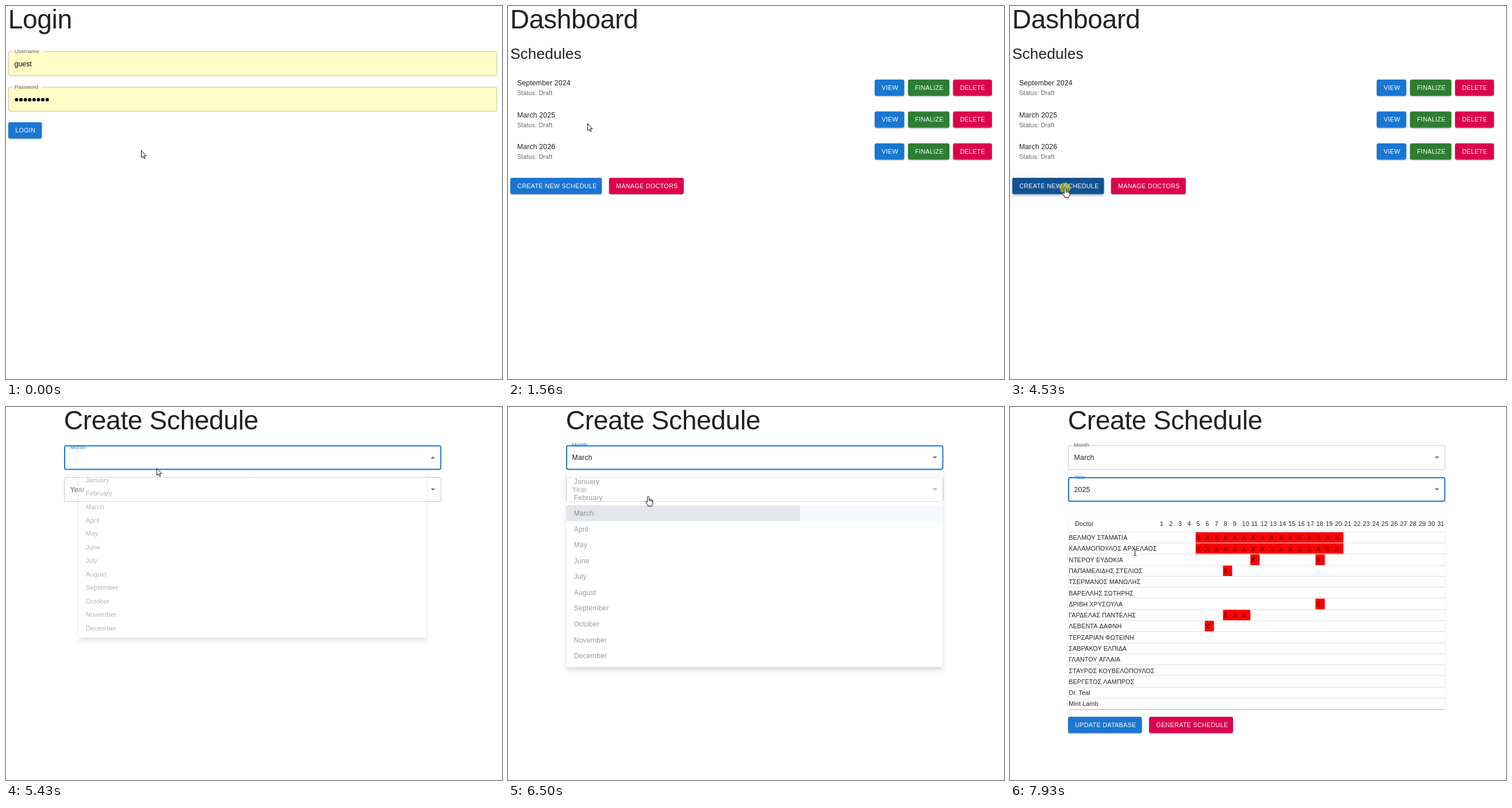
Recreate the animation shown at these times as an HTML page with a canvas. Size 863 px wide and 649 px high, loop 7990 ms.

```html
<!DOCTYPE html>
<html lang="en">
<head>
<meta charset="utf-8">
<title>Schedule planner</title>
<style>
html, body { margin: 0; width: 100%; height: 100%; overflow: hidden; background: #fff; }
canvas { display: block; }
</style>
</head>
<body>
<canvas id="stage" width="863" height="649"></canvas>
<script>
const ctx = document.getElementById('stage').getContext('2d');
const LOOP = 7990;
const BLUE = '#1976d2', DARK_BLUE = '#115293', RED = '#dc004e', GREEN = '#2e7d32';
const INK = 'rgba(0,0,0,.87)', SOFT = 'rgba(0,0,0,.6)', LINE = 'rgba(0,0,0,.23)';
const SMALL = 9.24, BODY2 = 10.78, BODY = 12.32, H4 = 26.2, H2 = 46.2;
const MONTHS = ['January', 'February', 'March', 'April', 'May', 'June', 'July', 'August',
  'September', 'October', 'November', 'December'];
const YEARS = ['2025', '2026'];
const DOCTORS = ['ΒΕΛΜΟΥ ΣΤΑΜΑΤΙΑ', 'ΚΑΛΑΜΟΠΟΥΛΟΣ ΑΡΧΕΛΑΟΣ', 'ΝΤΕΡΟΥ ΕΥΔΟΚΙΑ', 'ΠΑΠΑΜΕΛΙΔΗΣ ΣΤΕΛΙΟΣ',
  'ΤΣΕΡΜΑΝΟΣ ΜΑΝΩΛΗΣ', 'ΒΑΡΕΛΛΗΣ ΣΩΤΗΡΗΣ', 'ΔΡΙΒΗ ΧΡΥΣΟΥΛΑ', 'ΓΑΡΔΕΛΑΣ ΠΑΝΤΕΛΗΣ', 'ΛΕΒΕΝΤΑ ΔΑΦΝΗ',
  'ΤΕΡΖΑΡΙΑΝ ΦΩΤΕΙΝΗ', 'ΣΑΒΡΑΚΟΥ ΕΛΠΙΔΑ', 'ΓΛΑΝΤΟΥ ΑΓΛΑΙΑ', 'ΣΤΑΥΡΟΣ ΚΟΥΒΕΛΟΠΟΥΛΟΣ',
  'ΒΕΡΓΕΤΟΣ ΛΑΜΠΡΟΣ', 'Dr. Teal', 'Mint Lamb'];
// [row, first day, last day]
const BUSY = [[0, 5, 20], [1, 5, 20], [2, 11, 11], [2, 18, 18], [3, 8, 8], [6, 18, 18], [7, 8, 10], [8, 6, 6]];

const T = { dashboard: 1270, create: 4680, monthOpen: 5330, monthPick: 6372,
  yearOpen: 7120, yearPick: 7650, table: 7740 };
const CLICKS = [[1030, 1110], [4530, 4640], [5300, 5400], [6290, 6380], [7110, 7200], [7590, 7660]];
// [time, x, y]
const PATH = [[60, 235, 251], [300, 190, 172], [480, 120, 178], [690, 40, 214], [1030, 40, 214],
  [1180, 85, 223], [1500, 138, 208], [1800, 138, 188], [2250, 112, 285], [2530, 96, 316],
  [4600, 96, 316], [5290, 262, 105], [5430, 262, 106], [5740, 243, 184], [6330, 243, 184],
  [6500, 244, 155], [7060, 240, 147], [7130, 240, 147], [7390, 240, 186], [7640, 240, 186],
  [7930, 217.5, 253]];
const KINDS = [[0, 'arrow'], [270, 'beam'], [520, 'arrow'], [630, 'hand'], [1090, 'arrow'], [2400, 'hand'],
  [4700, 'arrow'], [5200, 'hand'], [5330, 'arrow'], [5560, 'hand'], [7130, 'arrow'], [7290, 'hand'],
  [7720, 'arrow'], [7880, 'beam']];
const CURSORS = {
  arrow: new Path2D('M.5.5V13L3.2 10.3 5.2 14.6 7.1 13.8 5.1 9.5H9Z'),
  hand: new Path2D('M-1.5 1.5Q0-1 1.5 1.5V6Q3 5 4 6.5 5.5 5.5 6.3 7 8 6.5 8 8.5V12Q8 14 6.5 15.5V17.5H-.5V16L-4.5 10.5Q-5 8.5-3 9L-1.5 10.5ZM1.5 6V9M4 6.5V9.5M6.3 7V10'),
  beam: new Path2D('M-2.5-5.5H-.8L0-5 .8-5.5H2.5M0-5V5M-2.5 5.5H-.8L0 5 .8 5.5H2.5')
};
// elevation: [dy, blur, spread, alpha]
const SHADOWS = {
  1: [[1.5, .8, -.8, .2], [.8, .8, 0, .14], [.8, 2.3, 0, .12]],
  2: [[2.3, .8, -1.5, .2], [1.5, 1.5, 0, .14], [.8, 3.9, 0, .12]],
  4: [[1.5, 3, -.8, .2], [3, 3.9, 0, .14], [.8, 7.7, 0, .12]],
  8: [[3.9, 3.9, -2.3, .2], [6.2, 7.7, .8, .14], [2.3, 10.8, 1.5, .12]]
};

const clamp = v => Math.max(0, Math.min(1, v));
const lerp = (a, b, p) => a + (b - a) * p;

// cubic-bezier(x1, 0, x2, 1)
function bezier(x1, x2, x) {
  let lo = 0, hi = 1, u = .5;
  for (let i = 0; i < 20; i++) {
    u = (lo + hi) / 2;
    if (3 * x1 * u * (1 - u) ** 2 + 3 * x2 * u * u * (1 - u) + u ** 3 < x) lo = u; else hi = u;
  }
  return u * u * (3 - 2 * u);
}
const inOut = x => bezier(.4, .2, clamp(x));
const easeOut = x => bezier(0, .2, clamp(x));

function text(str, x, y, size = BODY2, color = INK, spacing = .0094, align = 'left') {
  ctx.font = `${size}px "Liberation Sans", Arial, sans-serif`;
  ctx.letterSpacing = size * spacing + 'px';
  ctx.textAlign = align;
  ctx.fillStyle = color;
  ctx.fillText(str, x, y);
}

function box(x, y, w, h, r) {
  ctx.beginPath();
  ctx.roundRect(x, y, w, h, r);
}

function fillRect(x, y, w, h, color) {
  ctx.fillStyle = color;
  ctx.fillRect(x, y, w, h);
}

function paper(x, y, w, h, color, elevation) {
  ctx.save();
  box(x, y, w, h, 3);
  ctx.rect(-999, -999, 3000, 3000);
  ctx.clip('evenodd');
  const m = ctx.getTransform();
  ctx.setTransform(m.a, 0, 0, m.d, m.e - 2000, m.f);
  ctx.fillStyle = '#000';
  for (const [dy, blur, spread, alpha] of SHADOWS[elevation]) {
    ctx.shadowColor = `rgba(0,0,0,${alpha})`;
    ctx.shadowBlur = blur;
    ctx.shadowOffsetX = 2000;
    ctx.shadowOffsetY = dy;
    box(x - spread, y - spread, w + 2 * spread, h + 2 * spread, 3);
    ctx.fill();
  }
  ctx.restore();
  ctx.fillStyle = color;
  box(x, y, w, h, 3);
  ctx.fill();
}

function button(label, x, y, w, color, hover = 0) {
  paper(x, y, w, 28.2, color, hover > .5 ? 4 : 2);
  if (hover) {
    ctx.save();
    ctx.globalAlpha = hover;
    ctx.fillStyle = DARK_BLUE;
    ctx.fill();
    ctx.restore();
  }
  text(label, x + 12.2, y + 17.8, BODY2, '#fff', .0286);
}

function outline(x, y, w, h, color, width = 1) {
  box(x, y, w, h, 3);
  ctx.lineWidth = width;
  ctx.strokeStyle = color;
  ctx.stroke();
}

function filledInput(label, y, notchEnd, hover) {
  box(4, y, 850.5, 43, 3);
  ctx.fillStyle = '#fffcc8';
  ctx.fill();
  outline(4.5, y + .5, 849.5, 42, hover ? INK : LINE);
  fillRect(11, y - 1, notchEnd - 11, 2, '#fff');
  text(label, 14.8, y + 3, SMALL, SOFT);
}

function loginPage(t) {
  text('Login', 3.7, 39, H2, INK, -.0083);
  filledInput('Username', 78.8, 65);
  text('guest', 14.6, 105, BODY, '#000', 0);
  filledInput('Password', 140.5, 62, t > 270 && t < 520);
  ctx.fillStyle = '#000';
  for (let i = 0; i < 8; i++) {
    ctx.beginPath();
    ctx.arc(18.4 + 7.6 * i, 163, 3, 0, 7);
    ctx.fill();
  }
  button('LOGIN', 4, 202.2, 58.3, BLUE, inOut((t - 620) / 190) * (1 - inOut((t - 1170) / 250)));
}

function dashboardPage(t) {
  text('Dashboard', 3.7, 39, H2, INK, -.0083);
  text('Schedules', 3.9, 91.5, H4, INK, .0073);
  ['September 2024', 'March 2025', 'March 2026'].forEach((name, i) => {
    const y = 128 + 55.5 * i;
    text(name, 16, y + 10, BODY);
    text('Status: Draft', 16, y + 27, BODY2, SOFT, .0107);
    button('VIEW', 638, y, 51.5, BLUE);
    button('FINALIZE', 696, y, 72, GREEN);
    button('DELETE', 774.3, y, 67.7, RED);
  });
  button('CREATE NEW SCHEDULE', 4, 299, 159.3, BLUE, inOut((t - 2360) / 180));
  button('MANAGE DOCTORS', 175.8, 299, 130, RED);
}

function select(t, label, value, y, focusStart, focusEnd, open, hover) {
  const p = easeOut((t - focusStart) / 200);
  const focused = t >= focusStart && t < focusEnd;
  text(label, 111.6, lerp(y + 25.7, y + 2.5, p), lerp(BODY, SMALL, p), focused ? BLUE : SOFT);
  if (focused) outline(102, y + 1, 654.5, 41, BLUE, 2);
  else outline(101.5, y + .5, 655.5, 42, hover ? INK : LINE);
  text(value, 111.6, y + 25.7, BODY);
  const dir = open ? -1 : 1, mid = y + 21.3;
  ctx.beginPath();
  ctx.moveTo(738.9, mid - 1.9 * dir);
  ctx.lineTo(746.7, mid - 1.9 * dir);
  ctx.lineTo(742.8, mid + 1.9 * dir);
  ctx.fillStyle = 'rgba(0,0,0,.54)';
  ctx.fill();
}

function menu(t, items, top, start, pick, duration, picked) {
  if (t < start || t > pick + duration) return;
  const closing = t >= pick;
  const grow = closing ? 1 - inOut((t - pick - duration / 3) / (duration * .667))
    : inOut((t - start) / (duration * .667));
  const scale = .75 + .25 * grow, row = 27.65;
  ctx.save();
  ctx.globalAlpha = closing ? 1 - inOut((t - pick) / duration) : inOut((t - start) / duration);
  ctx.translate(429, top);
  ctx.scale(scale, scale * scale);
  ctx.translate(-429, -top);
  paper(101, top, 656, items.length * row + 12, '#fff', 8);

  const rowY = top + 6 + row * picked;
  const hovered = t > start + (items === MONTHS ? 380 : 200);
  if (closing) fillRect(101, rowY, 656, row, 'rgba(25,118,210,.08)');
  else if (hovered) fillRect(101, rowY, 656, row, 'rgba(0,0,0,.04)');
  const ripple = inOut((t - pick + 67) / 550);
  if (ripple > 0) {
    ctx.save();
    ctx.beginPath();
    ctx.rect(101, rowY, 656, row);
    ctx.clip();
    ctx.beginPath();
    ctx.arc(243, rowY + row / 2, 514 * ripple, 0, 7);
    ctx.fillStyle = `rgba(0,0,0,${.09 + .17 * ripple})`;
    ctx.fill();
    ctx.restore();
  }
  items.forEach((item, i) => text(item, 113.8, top + 24.3 + row * i, BODY));
  ctx.restore();
}

const dayX = day => day <= 11 ? 323 + (day - 5) * 15.87 : 418.2 + (day - 11) * 16.19;

function table() {
  const top = 217.8, row = 19.28;
  paper(101, 190, 656.5, 336, '#fff', 1);
  text('Doctor', 113, 207.4);
  for (let day = 1; day <= 31; day++) text(day, dayX(day) + 1.5, 207.4);
  for (const [r, first, last] of BUSY) {
    fillRect(dayX(first), top + r * row, dayX(last + 1) - dayX(first), row, '#f00');
    for (let day = first; day <= last; day++) text('X', dayX(day) + 1.2, top + r * row + 13.5);
  }
  DOCTORS.forEach((name, i) => {
    fillRect(101, Math.round(top + i * row) - 1, 656.5, 1, '#e0e0e0');
    text(name, 102.3, top + i * row + 13.4);
  });
  button('UPDATE DATABASE', 101, 539, 128.5, BLUE);
  button('GENERATE SCHEDULE', 242, 539, 146, RED);
}

function createPage(t) {
  text('Create Schedule', 100.8, 39, H2, INK, -.0083);
  select(t, 'Month', t < T.monthPick ? '' : 'March', 66.5, T.monthOpen, T.yearOpen,
    t >= T.monthOpen && t < T.monthPick, t > 5200 && t < T.monthOpen);
  select(t, 'Year', t < T.yearPick ? '' : '2025', 122, T.yearOpen, LOOP,
    t >= T.yearOpen && t < T.yearPick, t > 6718 && t < T.yearOpen);
  if (t >= T.table) table();
  menu(t, MONTHS, 110, T.monthOpen, T.monthPick, 346, 2);
  menu(t, YEARS, 165.6, T.yearOpen, T.yearPick, 232, 0);
}

function cursor(t) {
  const next = PATH.findIndex(k => k[0] > t);
  const b = PATH[next < 0 ? PATH.length - 1 : next], a = PATH[Math.max(0, next < 0 ? PATH.length - 1 : next - 1)];
  const p = b === a ? 0 : (t - a[0]) / (b[0] - a[0]);
  const kind = KINDS.findLast(k => k[0] <= t)[1];
  ctx.save();
  ctx.translate(lerp(a[1], b[1], p), lerp(a[2], b[2], p));
  if (CLICKS.some(([from, to]) => t >= from && t < to)) {
    ctx.beginPath();
    ctx.arc(-.3, .5, 9.5, 0, 7);
    ctx.fillStyle = 'rgba(235,220,0,.55)';
    ctx.fill();
  }
  if (kind !== 'beam') {
    ctx.fillStyle = '#fff';
    ctx.fill(CURSORS[kind]);
  }
  ctx.lineWidth = 1;
  ctx.strokeStyle = '#111';
  ctx.stroke(CURSORS[kind]);
  ctx.restore();
}

function draw(now) {
  const t = now % LOOP;
  fillRect(0, 0, 863, 649, '#fff');
  (t < T.dashboard ? loginPage : t < T.create ? dashboardPage : createPage)(t);
  cursor(t);
  requestAnimationFrame(draw);
}
requestAnimationFrame(draw);
</script>
</body>
</html>
```
